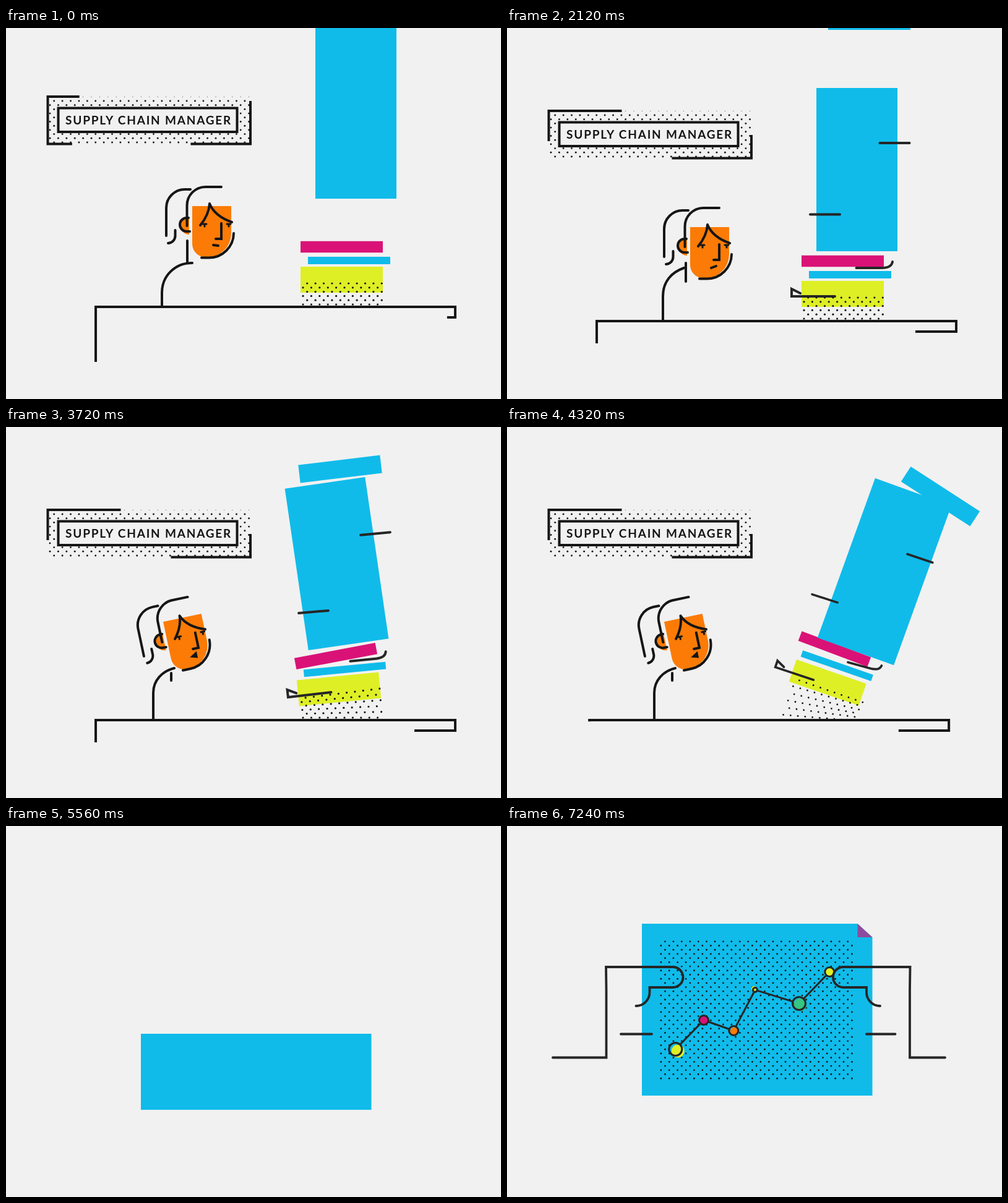
An HTML page that plays this animation: 800 by 600 pixels, repeating every 7.28 s.

```html
<!DOCTYPE html>
<html lang="en">
<head>
<meta charset="utf-8">
<title>Supply chain manager</title>
<style>
html, body { margin: 0; width: 100%; height: 100%; overflow: hidden; background: #f1f1f1; }
svg { display: block; width: 800px; height: 600px; }
text { font: 700 19px Lato, "Open Sans", sans-serif; letter-spacing: 1.8px; fill: #141414; }
</style>
</head>
<body>
<svg id="stage" viewBox="0 0 800 600"></svg>
<script>
const LOOP = 7280;
const INK = '#161616', SOFT_INK = '#262626', BG = '#f1f1f1';
const BLUE = '#10bbea', PINK = '#da1277', LIME = '#deef26', ORANGE = '#fb7b06';
const stage = document.getElementById('stage');

function add(parent, tag, attrs = {}) {
  const el = document.createElementNS('http://www.w3.org/2000/svg', tag);
  set(el, attrs);
  parent.append(el);
  return el;
}
function set(el, attrs) {
  for (const name in attrs) el.setAttribute(name, attrs[name]);
}
const group = (parent, attrs) => add(parent, 'g', attrs);
const line = (parent, d, width = 4, cap = 'round', stroke = INK) => add(parent, 'path', {
  d, stroke, fill: 'none', 'stroke-width': width, 'stroke-linecap': cap
});
const dot = (parent, cx, cy, r = 1.45) => add(parent, 'circle', { cx, cy, r, fill: INK });
const show = (el, on) => el.setAttribute('display', on ? 'inline' : 'none');

const clamp = x => Math.min(1, Math.max(0, x));
const span = (t, a, b) => clamp((t - a) / (b - a));
const smooth = x => (1 - Math.cos(Math.PI * x)) / 2;
const easeOut = (x, p = 2) => 1 - (1 - x) ** p;
const mix = (a, b, u) => a + (b - a) * u;
const mixAll = (a, b, u) => a.map((v, i) => mix(v, b[i], u));

// Rows are [time, ...values]; eased between neighbours.
function keyed(t, rows) {
  let i = 0;
  while (i < rows.length - 2 && t >= rows[i + 1][0]) i++;
  const a = rows[i], b = rows[i + 1];
  return mixAll(a, b, smooth(span(t, a[0], b[0]))).slice(1);
}
function trim(el, from, to) {
  show(el, to > from);
  set(el, { 'stroke-dasharray': `${Math.max(0, to - from)} 4000`, 'stroke-dashoffset': -from });
}
const place = (el, [x, y, angle, scale = 1]) =>
  el.setAttribute('transform', `translate(${x} ${y}) rotate(${angle}) scale(${scale})`);

// Office scene
const office = group(stage);

const sign = group(office);
for (let row = 0; row < 12; row++)
  for (let i = 0; i < 25; i++) {
    const x = (row % 2 ? 71 : 77.7) + i * 13.4;
    if (x < 396) dot(sign, x, 208 - row * 6.7, row === 11 ? 0.5 : 1.45);
  }
add(sign, 'rect', { x: 84.5, y: 152.5, width: 289, height: 38.5, fill: BG, stroke: INK, 'stroke-width': 4 });
add(sign, 'text', { x: 96, y: 178.5 }).textContent = 'SUPPLY CHAIN MANAGER';
const signLeft = line(sign, 'M107 210.5H67.5V134H300', 4, 'butt');
const signRight = line(sign, 'M395 141V210.5H200', 4, 'butt');

const desk = line(office, 'M145 563V474H726V491H300', 4, 'butt');
const body = line(office, '');
const neck = line(office, '');

const head = group(office);
add(head, 'path', { fill: ORANGE, d: 'M296 322H359V366A39 39 0 0 1 320 405H318A22 22 0 0 1 296 383ZM291 340A14 14 0 0 0 291 368Z' });
line(head, 'M311 405.5H323A40 40 0 0 0 363 366'
  + 'M254 370V325A30 30 0 0 1 284 295H293'
  + 'M287.5 354V321A30 30 0 0 1 317 291H343'
  + 'M268.5 361V370A12 12 0 0 1 257 382'
  + 'M290 341H287A11 11 0 0 0 287 363H292'
  + 'M324 318Q323 336 309 353M324 318Q332 338 360 348'
  + 'M343 350V375H334');
line(head, 'M313 351H319M316 351V355M352 351H358M355 351V355', 3);
const mouth = line(head, '');
const openMouth = add(head, 'path', { d: 'M328 387L338 381V390Z', fill: INK, stroke: INK, 'stroke-width': 1.5 });

// Stack: x, y, angle at rest, leaning left, and toppling right (with scale)
const block = (width, height, fill) => g =>
  add(g, 'rect', { x: -width / 2, y: -height / 2, width, height, fill });
const mark = d => g => line(g, d, 4, 'round', SOFT_INK);
const parts = {
  lime: { draw: block(133, 42, LIME), rest: [542.5, 430, 0], left: [538, 424, -5.6], fall: [513, 410.5, 25.5, .87] },
  strip: { draw: block(133, 12, BLUE), rest: [554.5, 399, 0], left: [547.5, 392, -5.5], fall: [529.5, 384.5, 25.7, .88] },
  pink: { draw: block(133, 18.5, PINK), rest: [542.5, 377, 0], left: [533, 370.5, -10.8], fall: [528.5, 356, 29, .87] },
  blue: { draw: block(131, 264, BLUE), rest: [565.5, 229, 0], left: [534.5, 221, -8.3], fall: [630, 237.5, 27.3, 1] },
  top: { draw: block(133, 29, BLUE), rest: [585.5, 76, 0], left: [540, 68, -6.9], fall: [743, 124, 43.5, 1] },
  low: { draw: mark('M-21 1L-35 -6V6H35'), rest: [495, 428, 0], left: [490, 427, -6.6], fall: [460, 384.5, 25, .91] },
  hook: { draw: mark('M-29 3H12Q28 3 29.5 -7'), rest: [593.5, 385, 0], left: [585, 373, -5.5], fall: [575.5, 388, 21, .9] },
  lineA: { draw: mark('M-24 0H24'), rest: [514, 301.5, 0], left: [497, 299, -5], fall: [518, 271.5, 24, .87] },
  lineB: { draw: mark('M-24 0H24'), rest: [626.5, 186, 0], left: [597, 172.5, -5.5], fall: [686, 223, 25, .87] },
  dotsLow: { rest: [543, 470, 0], left: [543, 470, 0], fall: [491, 470, 6, .85] },
  dotsTop: { rest: [543, 436, 0], left: [540, 431, -7], fall: [515, 425, 26, .87] }
};
for (const part of Object.values(parts)) {
  part.el = group(office);
  if (part.draw) part.shape = part.draw(part.el);
}
const dotRows = Array.from({ length: 6 }, (_, row) => {
  const g = group(office);
  for (let i = 0; i < 10; i++) dot(g, (row % 2 ? -56.3 : -63) + i * 13.4, 0, 1.6);
  return g;
});
const marks = ['low', 'hook', 'lineA', 'lineB'];

function stackPose({ rest, left, fall }, sway, topple, gone) {
  const [x, y, angle] = rest;
  const swung = [x + (x - left[0]) * sway, y + (left[1] - y) * Math.abs(sway), angle - left[2] * sway, 1];
  const pose = mixAll(swung, fall, topple);
  return [pose[0] - 130 * gone, pose[1] + 70 * gone, pose[2] + 20 * gone, pose[3] * (1 - gone)];
}

function drawStack(t) {
  const [sway] = keyed(t, [[2280, 0], [2570, 1.5], [2940, -1.25], [3310, 1.45], [3720, -1], [9999, -1]]);
  const topple = smooth(span(t, 3760, 4840) ** .55);
  const gone = span(t, 4840, 5200) ** 1.5;
  const pose = name => stackPose(parts[name], sway, topple, gone);

  for (const name in parts) place(parts[name].el, pose(name));

  const fallTop = pose('top');
  if (t < 2280) fallTop[1] -= 88 * (2280 - t) / 160;
  if (t > 4840) {
    const out = span(t, 4840, 5120);
    fallTop[0] = 743 + 190 * out;
    fallTop[1] = 124 + 110 * out;
    fallTop[3] = 1;
  }
  place(parts.top.el, fallTop);
  show(parts.top.el, t < 5150);

  // The big block drops, squashes and later swings down flat.
  let width = 131, height = 264, bluePose = pose('blue');
  if (t < 1500) {
    [height] = keyed(t, [[0, 300], [160, 300], [280, 228], [460, 282], [640, 255], [840, 262], [1200, 264], [1500, 264]]);
    bluePose[1] = 361 - 62 * (1 - span(t, 0, 160) ** 1.5) - height / 2;
  } else if (t < 4840) {
    height = mix(264, 277, topple);
  } else {
    const swing = keyed(t, [[4840, 630, 237.5, 27.3, 131, 277], [5360, 450, 512, 90, 125, 330], [5560, 404, 397.5, 90, 123, 372]]);
    bluePose = [...swing.slice(0, 3), 1];
    [, , , width, height] = swing;
  }
  place(parts.blue.el, bluePose);
  set(parts.blue.shape, { x: -width / 2, y: -height / 2, width, height });

  const low = pose('dotsLow'), high = pose('dotsTop');
  dotRows.forEach((g, i) => place(g, mixAll(low, high, i / 5)));

  marks.forEach((name, i) => trim(parts[name].shape, 0, 110 * smooth(span(t, 350 + i * 90, 1000 + i * 90))));
}

function drawHead(t, slide) {
  const [dx, dy, angle, lean, bend] = keyed(t, [
    [0, 5, -11, 0, 0, 0], [150, 5, -11, 0, 0, 0], [320, -2, 8, 2, 0, 1], [620, -4, -9, -3, 0, 1],
    [1000, -4, -12, -4, 0, 1], [1540, -4, -12, -4, 0, 1], [1800, 0, 0, 0, 0, 1], [2200, 0, 0, 0, 0, 1],
    [2760, -26, -4, -8, -9, 1], [3200, -42, -7, -12, -14, 1], [4300, -42, -7, -12, -14, 1], [4840, -42, -7.5, -10.2, -14, 1]
  ]);
  set(head, { transform: `translate(${dx - 45 * slide} ${dy}) rotate(${angle} 296 322)` });
  show(openMouth, t >= 2480);
  show(mouth, t < 2480);
  set(mouth, { d: `M330 ${385 + 3 * bend}L338 ${386 - bend}` });

  const bodyX = lean - 53 * slide, w = lean / -14;
  const [y, c1, c2x, c2y, endX, endY] = mixAll([451, 424, 273, 403, 301, 403], [434, 410, 266, 395, 286, 388 + 2 * w], bend);
  const foot = 474 - 13 * Math.min(1, slide);
  set(body, { d: `M252 ${foot}V${y - 4 * w}C252 ${c1} ${c2x} ${c2y} ${endX} ${endY}`, transform: `translate(${bodyX} 0)` });
  const neckX = 293 - 4 * bend + 1.57 * lean - 53 * slide;
  set(neck, { d: `M${neckX} ${367 + 13 * bend + 18 * w}V${403 + 7 * bend}` });
}

function drawOffice(t) {
  const [cameraY] = keyed(t, [[0, -23], [140, -23], [280, 8], [460, -5], [640, 1.5], [800, 0], [9999, 0]]);
  set(office, { transform: `translate(0 ${cameraY})` });

  const turn = easeOut(span(t, 0, 1500), 3);
  const slide = (Math.max(0, t - 4400) / 440) ** 2.8;
  trim(signLeft, 67 * turn, 167 + 67 * turn);
  trim(signRight, 32 * turn, 166 + 32 * turn);
  set(sign, { transform: `translate(${-78 * slide} 0)` });

  const [from, to, deskX] = keyed(t, [[4100, 0, 0, 0], [4840, 165, 75, -58], [5240, 947, 247, -250]]);
  trim(desk, 53 * turn + from, 700 + 53 * turn + to);
  set(desk, { transform: `translate(${deskX} 0)` });

  drawHead(t, slide);
  drawStack(t);
}

// Report scene
const report = group(stage);
const sheet = add(report, 'path', { fill: BLUE });
const flap = add(report, 'path', { fill: '#8e4b9d' });
const grid = group(report);
const gridRows = Array.from({ length: 34 }, (_, row) => {
  const g = group(grid);
  const indent = row % 2 ? 0 : 6.7;
  for (let x = 248.8 + indent; x < 559; x += 13.42) dot(g, x, 28.8 + row * 6.71, 1.4);
  return g;
});
const chartLine = line(report, '', 3, 'round', SOFT_INK);
// x, height, radius, fill, fill offset, fill radius
const nodes = [
  [272.3, 0, 10.5, LIME, 4, 3, 10.5], [318, 47, 7.5, PINK, 0, 0, 7], [366.3, 30, 7.5, ORANGE, 1, 1, 6.5],
  [401, 96, 3.6, LIME, -2, -2, 4], [472, 74, 10.5, '#35c583', 2, 2, 10.5], [521.3, 125, 7.5, LIME, 0, 0, 7]
].map(([x, rise, r, fill, dx, dy, fillR]) => ({
  x, rise, r, dx, dy, fillR,
  fillEl: add(report, 'circle', { fill }),
  ring: add(report, 'circle', { fill: 'none', stroke: SOFT_INK, 'stroke-width': 3 })
}));
const hand = (sleeveEnd, dashEnd) => line(report,
  `M${sleeveEnd} 374.5H160.5V265L160 228H268A16.5 16.5 0 0 1 268 261H230.5V269A22 22 0 0 1 208.5 291M184 336.5H${dashEnd}`,
  3.8, 'round', SOFT_INK);
const leftHand = hand(74, 234);
const rightHand = hand(103.5, 230.5);

function drawChart(t, top) {
  const grow = easeOut(span(t, 5960, 6455));
  const appear = smooth(span(t, 5880, 6120));
  let d = '';
  nodes.forEach((node, i) => {
    node.y = top + 203 - node.rise * grow;
    set(node.ring, { cx: node.x, cy: node.y, r: node.r * appear });
    const pop = easeOut(span(t, 6480 + i * 70, 6740 + i * 70), 3);
    set(node.fillEl, { cx: node.x + node.dx, cy: node.y + node.dy, r: node.fillR * pop });
    show(node.ring, appear > 0);
    const prev = nodes[i - 1];
    if (!prev || !appear) return;
    const dx = node.x - prev.x, dy = node.y - prev.y, len = Math.hypot(dx, dy);
    const a = prev.r / len, b = mix(a, 1 - node.r / len, appear);
    d += `M${prev.x + dx * a} ${prev.y + dy * a}L${prev.x + dx * b} ${prev.y + dy * b}`;
  });
  set(chartLine, { d });
}

function drawReport(t) {
  const [top, bottom, pull] = keyed(t, [
    [5560, 336, 459, -1], [5890, 93, 385, -8], [6200, 168, 454.5, 1], [6460, 156.5, 433, -.3], [6760, 158, 436, 0], [7280, 158, 436, 0]
  ]);
  const fold = smooth(span(t, 5880, 6120));
  const tug = clamp(pull);
  const fx = mix(24, 27.5, tug) * fold, fy = mix(22, 27, tug) * fold;
  const foldX = 590.5 - fx, foldY = top + fy;
  set(sheet, { d: `M218 ${top}H${foldX}L590.5 ${foldY}V${bottom}H218Z` });
  set(flap, { d: `M${foldX} ${top}L590.5 ${foldY}L${foldX - 2 * tug} ${foldY + tug}Z` });

  set(grid, { transform: `translate(0 ${top})` });
  const rows = gridRows.length * span(t, 5740, 6060);
  gridRows.forEach((g, i) => show(g, i < rows));
  drawChart(t, top);

  const away = 320 * (1 - easeOut(span(t, 5900, 6160), 2.5));
  const handY = 5 * pull;
  set(leftHand, { transform: `translate(${-away} ${handY})` });
  set(rightHand, { transform: `translate(${811.5 + away} ${handY}) scale(-1 1)` });
}

function render(t) {
  const reporting = t >= 5560;
  show(office, !reporting);
  show(report, reporting);
  if (reporting) drawReport(t);
  else drawOffice(t);
}

const start = performance.now();
function tick() {
  render((performance.now() - start) % LOOP);
  requestAnimationFrame(tick);
}
render(0);
requestAnimationFrame(tick);
</script>
</body>
</html>
```
